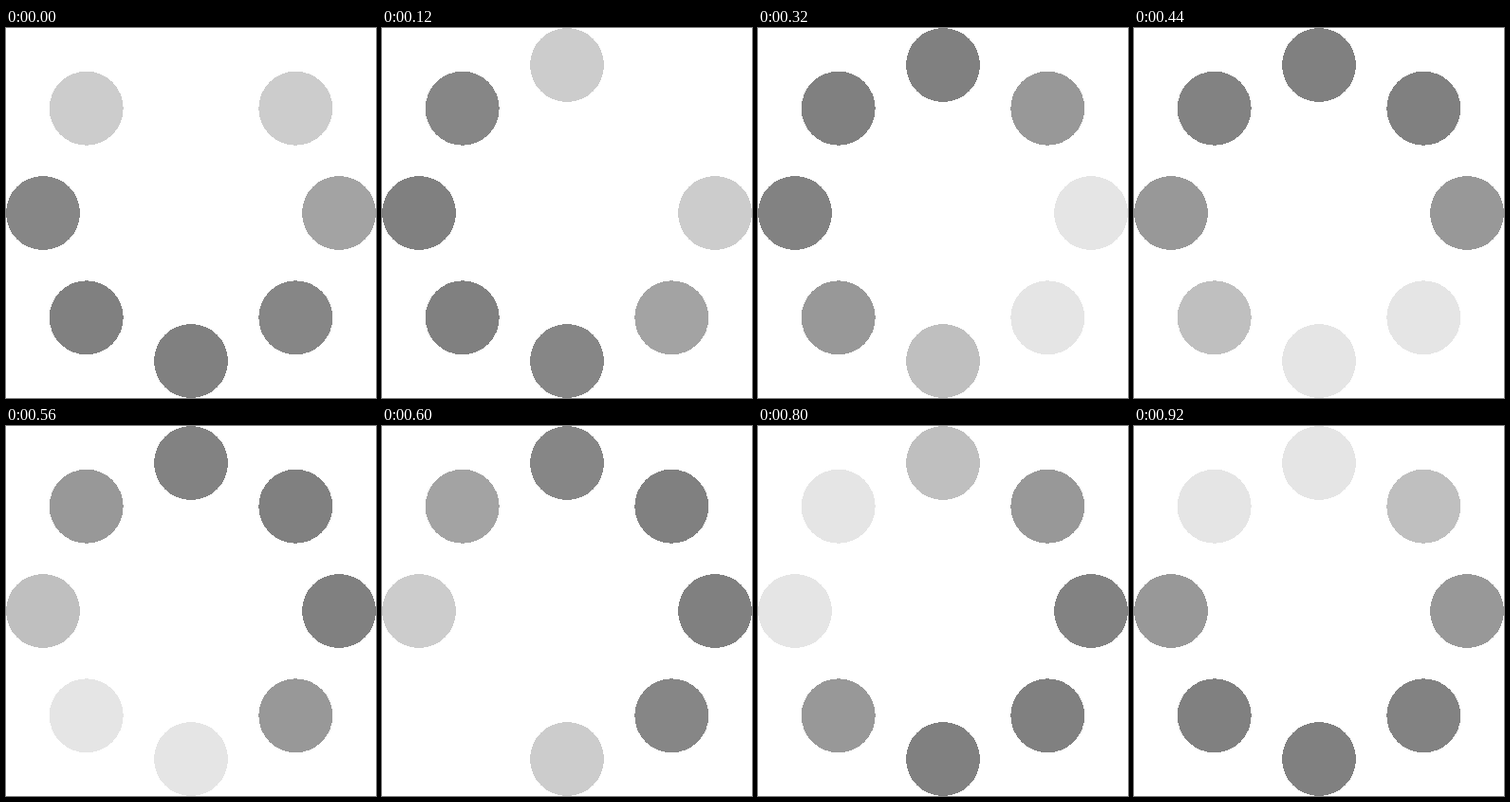
Recreate the animation shown at these times as an HTML page. Size 390x390 px, loop 0.96 s.

```html
<!DOCTYPE html>
<html lang="en">
<head>
<meta charset="utf-8">
<title>Loading</title>
<style>
  html, body { margin: 0; width: 100%; height: 100%; overflow: hidden; background: #fff; }
  svg { display: block; width: 100%; height: 100%; }
</style>
</head>
<body>
<svg id="stage" viewBox="0 0 390 390" shape-rendering="crispEdges"></svg>
<script>
  const STEP = 40, COUNT = 8, CENTER = 195, RING = 156, RADIUS = 39;
  // Grey level of one dot over its cycle: quick fade in, hold, slow fade out, reset.
  const FADE_IN = [255, 249, 229, 204, 176, 152, 134];
  const HOLD = Array(7).fill(128);
  const FADE_OUT = [130, 134, 142, 152, 163, 178, 191, 204, 218, 229];
  const LEVELS = [...FADE_IN, ...HOLD, ...FADE_OUT];
  const STEPS = LEVELS.length;
  const LAG = STEPS / COUNT;

  const stage = document.getElementById('stage');
  const dots = Array.from({ length: COUNT }, (_, i) => {
    const angle = i * 2 * Math.PI / COUNT;
    const dot = document.createElementNS('http://www.w3.org/2000/svg', 'circle');
    dot.setAttribute('cx', CENTER + RING * Math.sin(angle));
    dot.setAttribute('cy', CENTER - RING * Math.cos(angle));
    dot.setAttribute('r', RADIUS);
    return stage.appendChild(dot);
  });

  function draw(ms) {
    const step = Math.floor(ms / STEP);
    dots.forEach((dot, i) => {
      const v = LEVELS[(step + STEPS - i * LAG) % STEPS];
      dot.setAttribute('fill', `rgb(${v},${v},${v})`);
    });
  }

  const start = performance.now();
  function tick() {
    draw(Math.max(0, performance.now() - start));
    requestAnimationFrame(tick);
  }
  tick();
</script>
</body>
</html>
```
